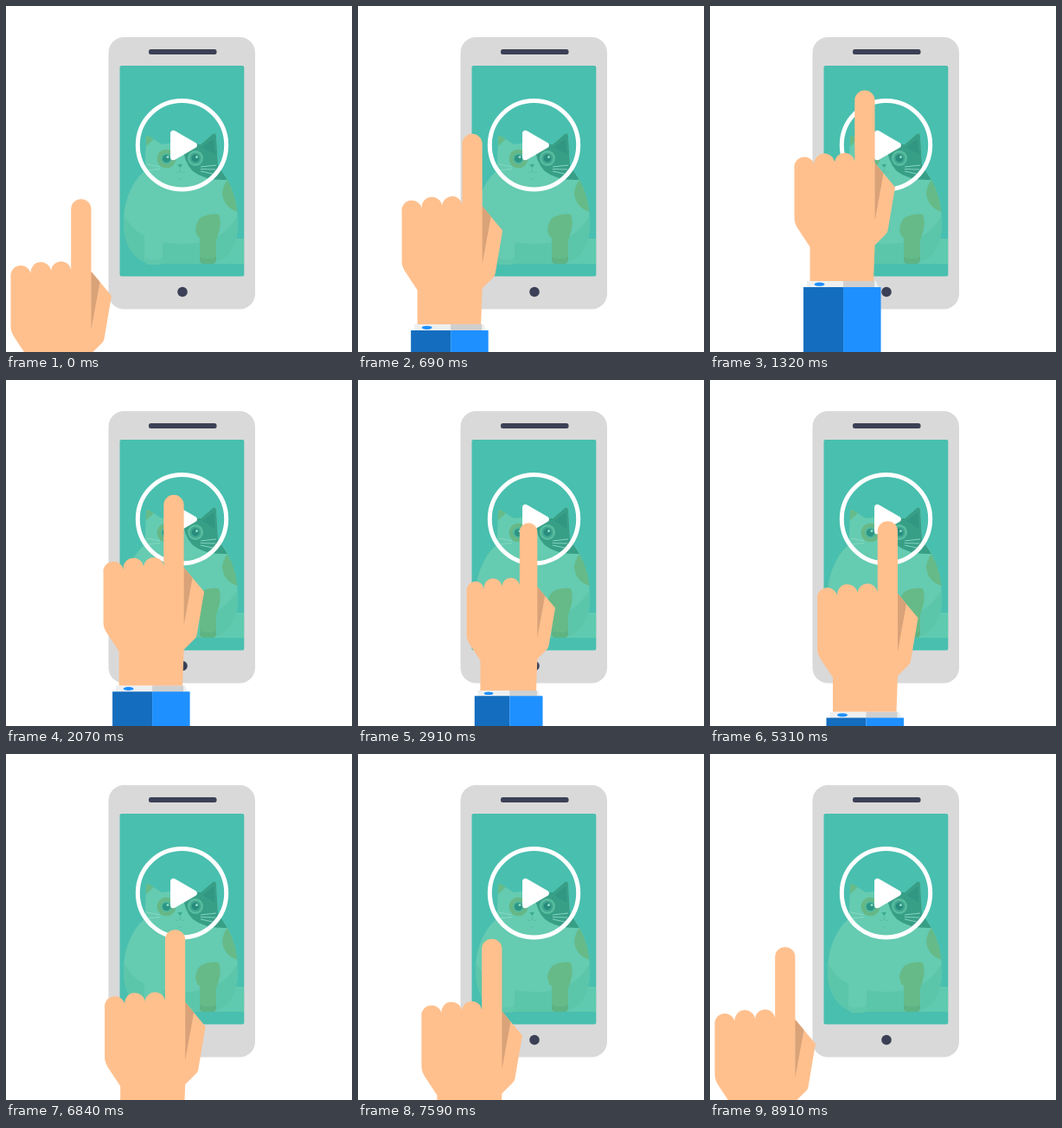
An HTML page for the animation above (9000 ms loop, 400 by 400 pixels).

```html
<!DOCTYPE html>
<html lang="en">
<head>
<meta charset="utf-8">
<title>Tap to play</title>
<style>
html, body { margin: 0; width: 100%; height: 100%; overflow: hidden; background: #fff; }
svg { display: block; width: 100%; height: 100%; }
</style>
</head>
<body>
<svg viewBox="0 0 400 400">
  <defs>
    <clipPath id="body">
      <path d="M161 175L162 152Q163 148 166 151L180 160Q202 156 225 160L239 148Q242 146 243 150L245 185C262 205 268 228 268 250C268 280 255 298 232 298H172C150 298 136 278 136 250C136 225 146 202 161 190Z"/>
    </clipPath>
  </defs>

  <rect x="118.500" y="36" width="169.500" height="314.500" rx="18" fill="#d9d9d9"/>
  <rect x="165" y="50" width="78.500" height="6" rx="2.500" fill="#3c4056"/>
  <circle cx="204" cy="330.500" r="5.800" fill="#3c4056"/>
  <rect x="131.500" y="69" width="143.800" height="243.500" rx="2" fill="#49bfaf"/>

  <g id="cat">
    <path d="M225 269H275V298H225Z" fill="#60cab0"/>
    <g clip-path="url(#body)">
      <path d="M130 140H275V300H130Z" fill="#65cbb1"/>
      <path d="M130 232C148 268 172 275 204 275C240 275 258 262 270 238V300H130Z" fill="#5cc6aa"/>
      <path d="M161 149L172 153L162 162Z" fill="#67bb87"/>
      <path d="M204 159L225 160L243 144L246 185L256 201Q230 202 216 191Q205 180 204 159Z" fill="#389f87"/>
      <path d="M227 163L240 153L242 172Z" fill="#319783"/>
      <path d="M256 201Q248 212 251 222Q254 234 270 239V201Z" fill="#66ba87"/>
    </g>
    <path d="M160 262H181V293Q181 299 175 299H166Q160 299 160 293Z" fill="#65cbb1"/>
    <path d="M160 291Q170 296 181 291V293Q181 299 175 299H166Q160 299 160 293Z" fill="#5fc7ac"/>
    <path d="M224 268C217 264 218 250 226 244Q236 239 246 241Q250 251 245 265L243 271V293Q243 298 238 298H229Q224 298 224 293Z" fill="#66ba87"/>
    <path d="M224 290Q234 294 243 290V293Q243 298 238 298H229Q224 298 224 293Z" fill="#5eb383"/>
    <circle cx="185.500" cy="176.500" r="10.800" fill="#67b886"/>
    <circle cx="185.500" cy="176.500" r="6.500" fill="#50b89c"/>
    <circle cx="185.500" cy="176.500" r="4.600" fill="#2c9483"/>
    <circle cx="187" cy="174.500" r="1.500" fill="#8fd9c7"/>
    <circle cx="219" cy="176" r="9" fill="#58bda0"/>
    <circle cx="219" cy="176" r="6.600" fill="#42a78f"/>
    <circle cx="219" cy="176" r="4.400" fill="#278c7c"/>
    <circle cx="220.500" cy="174.500" r="1.500" fill="#8fd9c7"/>
    <path d="M198.500 183H204L201.300 187Z" fill="#3ba98f"/>
    <path d="M201.300 187V191M196 192Q199 194 201.300 191Q204 194 207 192M199 200H204" fill="none" stroke="#56bea3" stroke-width=".8"/>
    <path d="M225 186L243 184M225 188.500L242 189M225 191L239 194M178 186L163 183M178 188.500L164 190" fill="none" stroke="#8bdac7" stroke-width=".9"/>
  </g>

  <g id="button" fill="none" stroke="#fff" stroke-width="5">
    <circle cx="203.500" cy="160.700" r="51.200"/>
    <path d="M193.500 147.300V174.700L217.300 161Z" fill="#fff" stroke-width="7" stroke-linejoin="round"/>
  </g>

  <g id="hand">
    <path d="M20 443.500H100L103 451H20Z" fill="#eef0f0"/>
    <path d="M62 443.500H98V451H62Z" fill="#cfcfcf"/>
    <ellipse cx="34.500" cy="447.200" rx="6" ry="2.100" fill="#1e90ff"/>
    <path d="M16 450.500H62V573H16Z" fill="#146dbe"/>
    <path d="M62 450.500H105.500V573H62Z" fill="#1e90ff"/>
    <path d="M5.500 313.500A11.600 11.600 0 0 1 28.600 310A11.700 11.700 0 0 1 52 306A11.700 11.700 0 0 1 75.200 305V234.800A11.600 11.600 0 0 1 98.500 234.800V307L122 335L113.500 385Q113 388 110.500 390L98.500 402L97 443.500H23.500V404L9 382Q5.500 376 5.500 371Z" fill="#ffc08e"/>
    <path d="M98.500 307L108.500 319L98.500 374Z" fill="#d9a278"/>
  </g>
</svg>
<script>
const LOOP = 9000;
const hand = document.getElementById('hand');
const button = document.getElementById('button');

// time, horizontal offset, fingertip height
const reach = [
  [0, 0, 223], [930, 65, 121], [1320, 92, 97.5], [1440, 97.3, 94.3],
  [1860, 104, 123], [2700, 113, 144]
];
const leave = [
  [4560, 113, 144], [5310, 118.5, 163], [5490, 120.7, 169.7], [5700, 121.7, 178],
  [6420, 113.7, 200.5], [6840, 108.7, 203], [7350, 84, 210.5], [7590, 68, 213.5],
  [8280, 20.7, 220.3], [8910, 0, 223]
];

// Smooth curve through the keys, at rest at both ends
function tangent(keys, i, c) {
  const a = keys[i - 1], b = keys[i], d = keys[i + 1];
  if (!a || !d) return 0;
  const h = b[0] - a[0], k = d[0] - b[0];
  return ((b[c] - a[c]) / h * k + (d[c] - b[c]) / k * h) / (h + k);
}

function along(keys, t, c) {
  const last = keys.length - 1;
  if (t <= keys[0][0]) return keys[0][c];
  if (t >= keys[last][0]) return keys[last][c];
  const i = keys.findIndex(key => key[0] > t) - 1;
  const a = keys[i], b = keys[i + 1];
  const span = b[0] - a[0], p = (t - a[0]) / span, q = 1 - p;
  return a[c] * q * q * (1 + 2 * p) + b[c] * p * p * (3 - 2 * p)
    + span * p * q * (tangent(keys, i, c) * q - tangent(keys, i + 1, c) * p);
}

function ease(t, from, to) {
  const p = Math.min(1, Math.max(0, (t - from) / (to - from)));
  return p * p * (3 - 2 * p);
}

// Rises from 0 to 1 and falls back
const pulse = (t, start, peak, end) => ease(t, start, peak) - ease(t, peak, end);

function place(el, x, y, cx, cy, scale) {
  el.setAttribute('transform',
    `translate(${x + cx} ${y + cy}) scale(${scale}) translate(${-cx} ${-cy})`);
}

function draw(now) {
  const t = now % LOOP;
  const keys = t < 4000 ? reach : leave;
  place(hand, along(keys, t, 1), along(keys, t, 2) - 223, 64, 398,
    1 - 0.153 * pulse(t, 2700, 3000, 3300));
  place(button, 0, 0, 203.5, 160.7, 1 + 0.2 * pulse(t, 3000, 3270, 3960));
}

let start;
function frame() {
  const now = performance.now();
  start ??= now;
  draw(now - start);
  requestAnimationFrame(frame);
}
frame();
</script>
</body>
</html>
```
